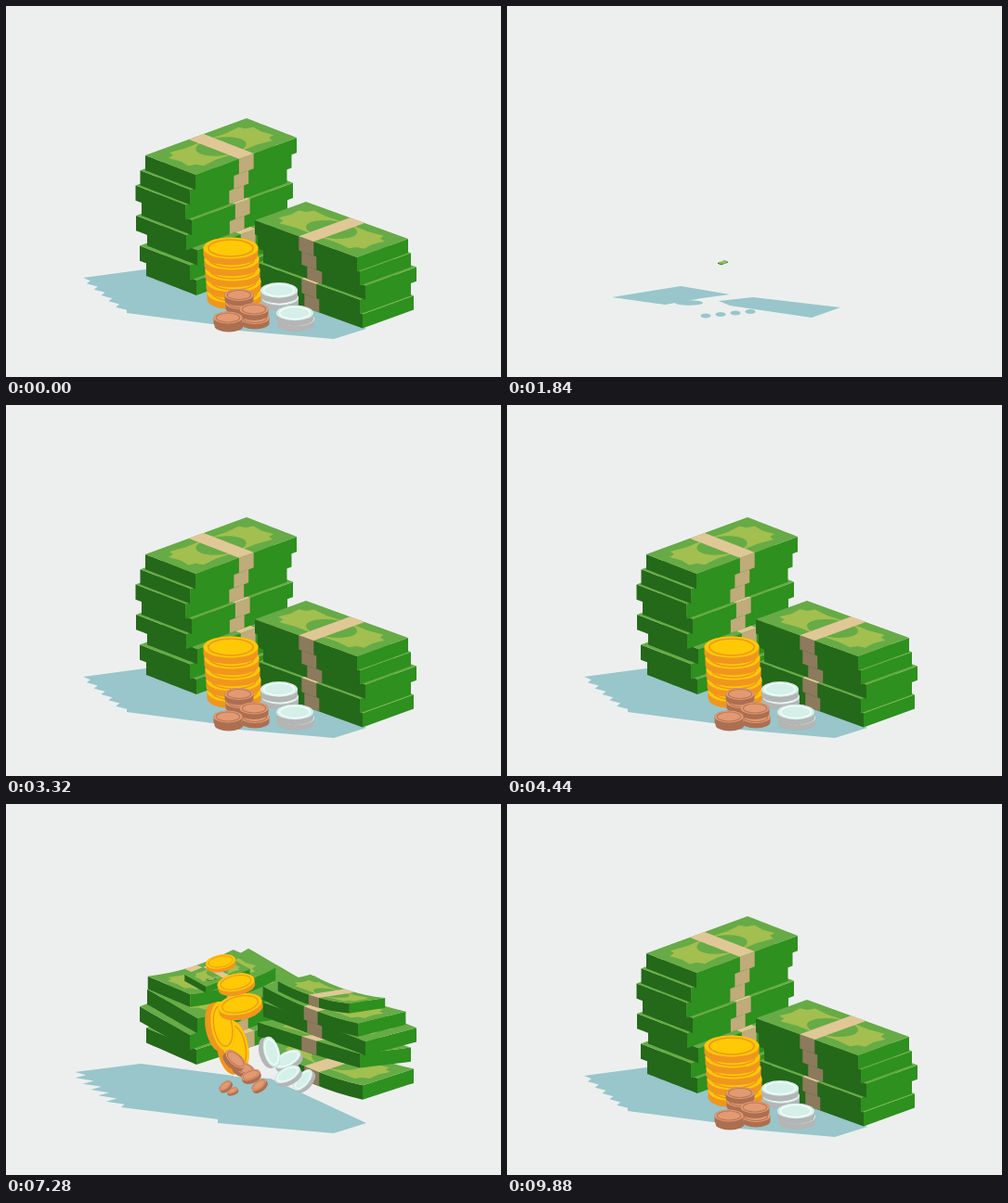
Animation, 533 px wide and 400 px high, one loop 9920 ms. Source, as an HTML page with a canvas:

```html
<!DOCTYPE html>
<html lang="en">
<head>
<meta charset="utf-8">
<title>Money stacks</title>
<style>
html, body { margin: 0; width: 100%; height: 100%; overflow: hidden; background: #edefef; }
canvas { display: block; width: 533px; height: 400px; }
</style>
</head>
<body>
<canvas id="stage" width="533" height="400"></canvas>
<script>
const ctx = document.getElementById('stage').getContext('2d');
const CYCLE = 4960;
const GREEN = { top: '#66ab46', print: '#a2bf4f', dark: '#24681a', bright: '#2e901e' };
const BAND = { top: '#e0c896', dark: '#8c7a5c', bright: '#c0ab7a' };
const SHADE = '#98c6ca';
const GOLD = { rx: 29.5, ry: 11.5, thick: 7, line: 1.6, top: '#ffc905', side: '#f0961e', ring: '#f0961e' };
const SILVER = { rx: 20, ry: 8.3, thick: 6, line: 1.1, top: '#d4f0e9', side: '#b4b5b5', ring: '#ffffff' };
const COPPER = { rx: 15.5, ry: 6.5, thick: 5.5, line: 1.1, top: '#e29a72', side: '#ac6f50', ring: '#b87755' };

const lerp = (a, b, t) => a + (b - a) * t;
const mix = (p, q, t) => p.map((n, i) => lerp(n, q[i], t));
const smooth = x => { x = Math.max(0, Math.min(1, x)); return x * x * (3 - 2 * x); };
const arc = x => x > 0 && x < 1 ? Math.sin(Math.PI * x) : 0;
const wobble = seed => Math.sin(seed * 2.4 + 1);
const range = (n, fn) => Array.from({ length: n }, (_, i) => fn(i));

// Growth, flight (quick rise, slower fall) and small rebound of one piece
function pose(e, { start, dur, height, spawn, grow, bounce = 0 }) {
  const age = e - start;
  const s = smooth(age / grow);
  const fly = age > 0 ? arc((age / dur) ** 0.75) : 0;
  const hop = arc((age - dur) / (dur * 0.55));
  return { s, fly, hop, lift: height * fly + spawn * (1 - s) + bounce * hop };
}

function fillPath(points, color) {
  ctx.beginPath();
  points.forEach(p => ctx.lineTo(p[0], p[1]));
  ctx.closePath();
  ctx.fillStyle = color;
  ctx.fill();
}

// Quarter outline of the banknote print, mirrored to all corners
const quarter = [[0.1, 0.5], [0.08, 0.3], [0.14, 0.27], [0.16, 0.16], [0.3, 0.2], [0.5, 0.18]];
const half = quarter.concat(quarter.map(([u, v]) => [1 - u, v]).reverse());
const print = half.concat(half.map(([u, v]) => [u, 1 - v]).reverse());
const seal = range(28, i => {
  const t = i * Math.PI / 14;
  return [0.5 + 0.2 * Math.cos(t), 0.5 + 0.3 * Math.sin(t)];
});

// u runs along the note, v across it, z down the bundle
function drawBundle(b, e) {
  const p = pose(e, b);
  if (p.s < 0.01) return;
  const { long, short, h, front, end, longTone, endTone } = b.shape;
  const at = (u, v, z = 0) => {
    const x = long[0] * (u - 0.5) + short[0] * (v - 0.5);
    const y = long[1] * (u - 0.5) + short[1] * (v - 0.5) + (z - 0.5) * h;
    const flex = b.pitch * (u - 0.5) + b.roll * (v - 0.5) + b.bend * (1 - (2 * u - 1) ** 2);
    return [b.x + p.s * x, b.y - p.lift + p.s * (y + p.fly * flex)];
  };
  const face = (corners, color) => fillPath(corners.flatMap((q, i) =>
    range(8, k => at(...mix(q, corners[(i + 1) % 4], k / 8)))), color);
  const top = (u0, u1, color) => face([[u0, 0, 0], [u1, 0, 0], [u1, 1, 0], [u0, 1, 0]], color);
  const side = (u0, u1, color) =>
    face([[u0, front, 0], [u1, front, 0], [u1, front, 1], [u0, front, 1]], color);

  face([[end, 0, 0], [end, 1, 0], [end, 1, 1], [end, 0, 1]], GREEN[endTone]);
  side(0, 1, GREEN[longTone]);
  side(0.43, 0.575, BAND[longTone]);
  top(0, 1, GREEN.top);
  fillPath(print.map(q => at(...q)), GREEN.print);
  fillPath(seal.map(q => at(...q)), GREEN.top);
  top(0.43, 0.575, BAND.top);
}

function drawCoin(c, e) {
  const p = pose(e, c);
  if (p.s < 0.01) return;
  const { rx, thick, line, top, side, ring } = c.kind;
  const ry = c.kind.ry * (1 + 0.2 * p.fly);
  ctx.save();
  ctx.translate(c.x + c.drift * p.fly, c.y - p.lift);
  ctx.rotate(c.turn * p.fly + c.rock * p.hop);
  ctx.scale(p.s, p.s);
  ctx.fillStyle = side;
  ctx.beginPath();
  ctx.ellipse(0, thick, rx, ry, 0, 0, Math.PI);
  ctx.ellipse(0, 0, rx, ry, 0, Math.PI, 2 * Math.PI);
  ctx.fill();
  ctx.fillStyle = top;
  ctx.beginPath();
  ctx.ellipse(0, 0, rx, ry, 0, 0, 2 * Math.PI);
  ctx.fill();
  ctx.strokeStyle = ring;
  ctx.lineWidth = line;
  ctx.beginPath();
  ctx.ellipse(0, 0, rx * 0.82, ry * 0.78, 0, 0, 2 * Math.PI);
  ctx.stroke();
  ctx.restore();
}

// Pieces are built top to bottom; the lowest one appears first
function stack(shape, x, y, shifts, motion) {
  return shifts.map((dx, i) => ({
    shape, x: x + dx, y: y + shape.h * i, grow: 220, spawn: -15,
    roll: 8 + 6 * wobble(i), pitch: 7 * wobble(i + 4), bend: 3 + 4 * wobble(i * 2 + 3),
    ...motion(i, shifts.length - 1 - i)
  }));
}

function pile(kind, x, y, count, gap, motion) {
  return range(count, i => ({
    kind, x: x + i, y: y + gap * i, grow: 320, turn: 0, drift: 0, rock: 0, ...motion(i)
  }));
}

const tall = stack(
  { long: [109, -40], short: [54, 21], h: 16.25, front: 1, end: 0, longTone: 'bright', endTone: 'dark' },
  231.5, 159.6, [0, -5.5, -10.5, -4, -10, 2, -6, 1],
  (i, n) => ({ start: 1960 + 65 * n, dur: 680, height: 32 + 4 * n }));

const low = stack(
  { long: [110, 40], short: [55, -20], h: 15.3, front: 0, end: 1, longTone: 'dark', endTone: 'bright' },
  350.5, 248.6, [0, 3, 9, 3, 6],
  (i, n) => ({ start: 2000 + 45 * n, dur: 580, height: 34 + 5 * n, bounce: 3 }));

const gold = pile(GOLD, 242, 261, 5, 12, i => ({
  start: 2150 - 30 * i, dur: 650, height: 70 - 6 * i, spawn: 60,
  turn: i < 3 ? -0.2 : 1.4, drift: 12 * Math.sin(i * 2 - 1.6),
  bounce: i ? 0 : 8, rock: i ? 0 : 0.4
}));

const silverMotion = order => i => ({
  start: 2080 + 25 * order + 15 * i, dur: 620, height: 38, spawn: 8,
  turn: order ? -0.5 - 0.4 * i : 1.3 - 1.8 * i, drift: i ? 8 : -8
});
const silver = [pile(SILVER, 294, 306.5, 2, 8, silverMotion(0)), pile(SILVER, 311, 331, 2, 6, silverMotion(1))];

const copperMotion = order => i => ({
  start: 2080 + 40 * order + 20 * i, dur: 850, height: 38, spawn: 5,
  turn: 0.9 * wobble(order * 2 + i * 5), drift: i ? 5 : -4
});
const copper = [[251, 311.5, 9], [267, 327, 9.5], [239, 336, 3.5]]
  .map(([x, y, gap], order) => pile(COPPER, x, y, 2, gap, copperMotion(order)));

// Shadow outlines: a single flat bundle, and the finished stack
const tallShade = {
  small: [[187, 302], [240, 311], [210, 315], [170, 322], [113, 314]],
  full: [[150, 284], [245, 297], [245, 346], [130, 331], [83, 293]]
};
const lowShade = {
  small: [[265, 314], [359, 325], [328, 336], [240, 323], [228, 318]],
  full: [[285, 300], [388, 348], [353, 359], [228, 348], [228, 297]]
};

function drawShadow(e) {
  const size = smooth((e - 1900) / 95);
  if (!size) return;
  const spread = smooth((e - 1995) / 250);
  const wave = arc((e - 2000) / 1100);
  const outline = ({ small, full }, ox, oy) => small.map((p, i) => {
    const [x, y] = mix(p, full[i], spread);
    return [lerp(ox, x, size), lerp(oy, y, size) - 5 * wave];
  });

  const left = outline(tallShade, 177, 312).map(([x, y]) => [x - 0.07 * wave * (240 - x), y]);
  const [from, to] = left.slice(3);
  const teeth = range(11, k => {
    const [x, y] = mix(from, to, (k + 1) / 12);
    return [x + (k % 2 ? -1 : 1) * (4 + 5 * wave) * spread, y];
  });
  fillPath([...left.slice(0, 4), ...teeth, to], SHADE);
  fillPath(outline(lowShade, 293, 325), SHADE);

  // Coin shadows in a row, plus the pile in front of the notes
  for (let i = 0; i < 4; i++) {
    ctx.beginPath();
    ctx.ellipse(214 + 16 * i, 334 - 1.5 * i, 5.5 * size, 2.4 * size, 0, 0, 2 * Math.PI);
    ctx.fill();
  }
  ctx.beginPath();
  ctx.ellipse(196, 320, 15 * size, 2.8 * size, 0, 0, 2 * Math.PI);
  ctx.fill();
}

function upward(items, draw, e) {
  for (let i = items.length - 1; i >= 0; i--) draw(items[i], e);
}

function render(now) {
  const t = now % CYCLE;
  // Collapse replays the build-up backwards, a little faster
  const e = t < 1900 ? 3100 - (t - 980) * 1.285 : t;
  ctx.fillStyle = '#edefef';
  ctx.fillRect(0, 0, 533, 400);
  drawShadow(e);
  for (const notes of [tall, low]) upward(notes, drawBundle, e);
  for (const coins of [gold, ...silver, ...copper]) upward(coins, drawCoin, e);
}

let begin;
function tick(now) {
  begin ??= now;
  render(now - begin);
  requestAnimationFrame(tick);
}
render(0);
requestAnimationFrame(tick);
</script>
</body>
</html>
```
